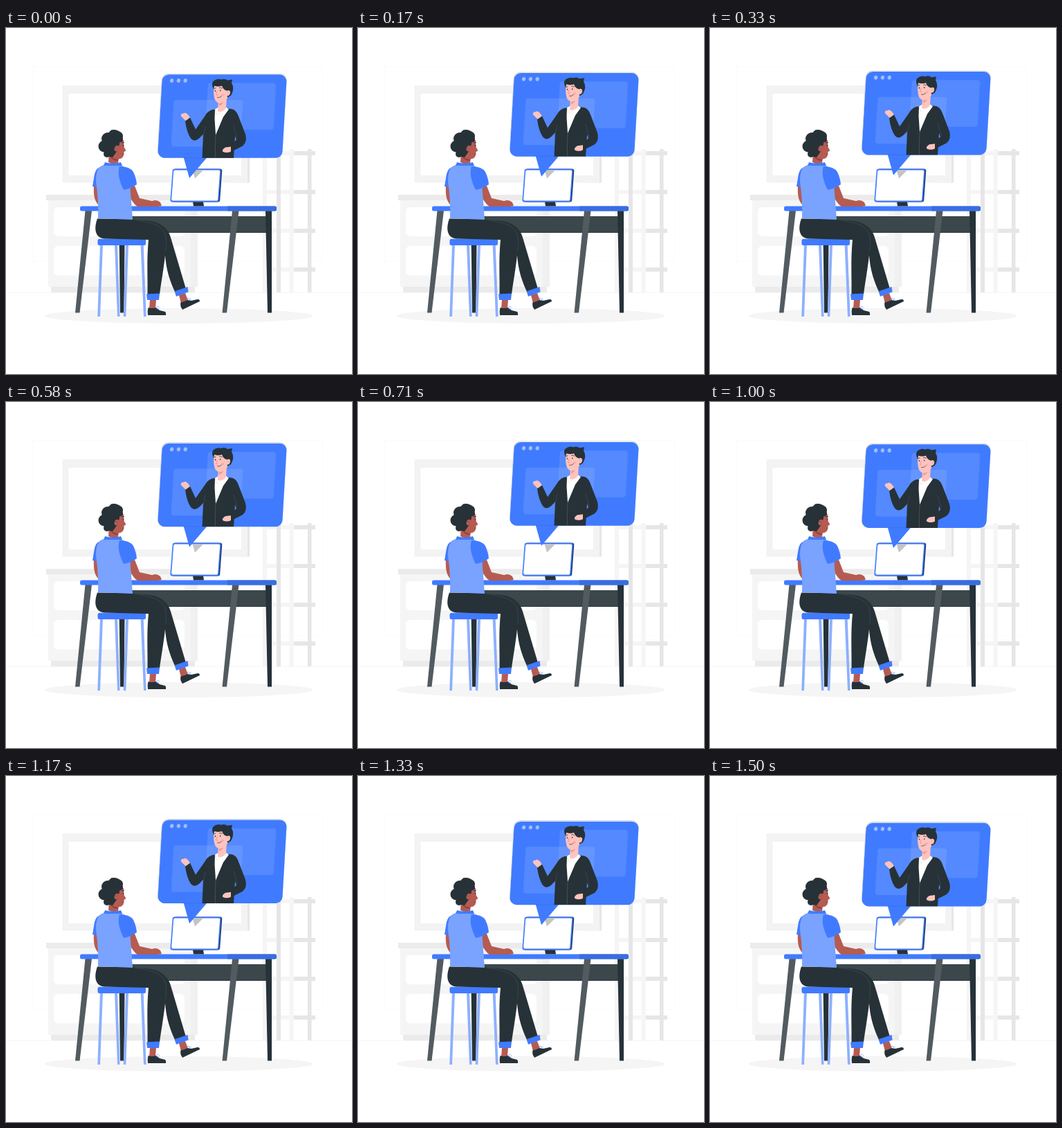
An HTML page with a canvas that plays this animation: 500x500 px, repeating every 1540 ms.

```html
<!DOCTYPE html>
<html lang="en">
<head>
<meta charset="utf-8">
<title>Video call</title>
<style>
html, body { margin: 0; width: 100%; height: 100%; overflow: hidden; background: #fff; }
canvas { display: block; width: 500px; height: 500px; }
</style>
</head>
<body>
<canvas id="stage"></canvas>
<script>
const canvas = document.getElementById('stage');
const ctx = canvas.getContext('2d');
const dpr = window.devicePixelRatio || 1;
canvas.width = canvas.height = 500 * dpr;

const LOOP = 1540, STEPS = 37, RISE = 10, PEAK_STEP = 17.5;
const BLUE = '#407bff', LIGHT_BLUE = '#79a3ff', LEG_BLUE = '#8cb0ff';
const DARK = '#263238', STEEL = '#525b60';
const BROWN = '#b55b52', PINK = '#ffc3bd';
const PALE = '#f5f5f5', GREY = '#e6e6e6';

function fill(color, d) {
  ctx.fillStyle = color;
  ctx.fill(new Path2D(d));
}

function line(color, width, d) {
  ctx.strokeStyle = color;
  ctx.lineWidth = width;
  ctx.lineCap = ctx.lineJoin = 'round';
  ctx.stroke(new Path2D(d));
}

function box(color, x1, y1, x2, y2, r = 0) {
  ctx.fillStyle = color;
  ctx.beginPath();
  ctx.roundRect(x1, y1, x2 - x1, y2 - y1, r);
  ctx.fill();
}

function oval(color, x, y, rx, ry, angle = 0) {
  ctx.fillStyle = color;
  ctx.beginPath();
  ctx.ellipse(x, y, rx, ry, angle, 0, Math.PI * 2);
  ctx.fill();
}

// Rounded parallelogram: top-left corner, width, height, leftward shift of the base.
function slanted(x, y, w, h, shift, r) {
  const corners = [[x, y], [x + w, y], [x + w - shift, y + h], [x - shift, y + h]];
  const path = new Path2D();
  path.moveTo(x + w / 2, y);
  for (let i = 1; i <= 4; i++) {
    path.arcTo(...corners[i % 4], ...corners[(i + 1) % 4], r);
  }
  path.closePath();
  return path;
}

function drawRoom() {
  ctx.strokeStyle = '#fafafa';
  ctx.lineWidth = 1;
  ctx.strokeRect(39.5, 55.5, 204, 282);
  ctx.strokeRect(255.5, 55.5, 202, 282);
  box('#ebebeb', 0, 382, 500, 382.6);

  box(GREY, 330, 83, 352, 223.5);
  box('#f3f3f3', 81.5, 83, 349, 223.5);
  box('#fff', 90.5, 95, 340, 213);

  box('#f0f0f0', 250, 249, 277, 374);
  box(PALE, 61, 249, 267, 374);
  box('#ebebeb', 58, 241, 277, 249);
  box('#ebebeb', 65, 374, 273, 382);
  box('#fff', 69, 259, 258, 301, 6);
  box('#fff', 69, 315, 258, 357.5, 6);

  box(PALE, 371, 175, 377, 382);
  box(GREY, 391, 175, 397, 382);
  for (let y = 178; y < 350; y += 56) {
    box(PALE, 377, y, 416, y + 6);
    box(GREY, 391, y, 397, y + 6);
    box(GREY, 416, y, 447, y + 6);
  }
  box(PALE, 409.5, 175, 415.5, 382);
  box(GREY, 436, 175, 441.5, 382);
  oval(PALE, 249.5, 416, 194, 11);
}

function drawDesk() {
  box('#3c474c', 166, 272, 378, 296);
  box('#313d43', 183, 294.8, 378, 296);
  fill(DARK, 'M163 264H172L170.5 411.5H165Z');
  fill(DARK, 'M375 264H384L384 411.5H378Z');
  fill(STEEL, 'M114.5 264H124L106.5 411.5H100Z');
  fill(STEEL, 'M327 264H336.5L319 411.5H312.5Z');
  box(BLUE, 107, 257.5, 391, 264.5, 2.5);
  box('#396ddf', 320, 257.5, 391, 264.5, [0, 2.5, 2.5, 0]);
}

function drawMonitor() {
  fill(DARK, 'M270 251H285L286 257.5H271Z');
  ctx.fillStyle = '#233f80';
  ctx.fill(slanted(242.5, 203.5, 70, 48, 3.5, 3));
  ctx.fillStyle = BLUE;
  ctx.fill(slanted(240.8, 203.5, 70, 48, 3.6, 3));
  ctx.fillStyle = '#fff';
  ctx.fill(slanted(242.3, 205.5, 67, 44, 3.3, 2));
  fill('#c4c4c4', 'M269.5 205.5H285L273 217.5Z');
}

function drawStool() {
  fill(LEG_BLUE, 'M136 313H140L136 417H132.3Z');
  fill(LEG_BLUE, 'M194.6 313H198.7L202.6 417H199Z');
  fill(LEG_BLUE, 'M157 313H161L164.5 417H161Z');
  fill(LEG_BLUE, 'M173 313H177L173.3 417H169.7Z');
  box(BLUE, 132.5, 304.8, 202, 314, 2.5);
}

function drawSitter() {
  // Feet
  fill(BROWN, 'M208 392H217L216 406H207Z');
  fill(BROWN, 'M250 386L259 383L263 394L253 398Z');
  fill(DARK, 'M205.5 404Q211 406 217 404L222 408L230 410Q232 412 231 415H205Q204 409 205.5 404Z');
  fill(DARK, 'M252.5 396.5Q258 396 262 393L268 394L277 392Q280 392 280 395L255 407Q251 402 252.5 396.5Z');
  line(LIGHT_BLUE, 0.7, 'M217 405L219 402L222 404M218 406L221 406M262 393L263 390L266 392M264 394L267 391');

  // Trousers
  fill(DARK, 'M174 279C220 274 234 286 239 306L260 377L245 383C235 362 228 339 230 307L190 304Z');
  fill(DARK, 'M132 275.5L183 276C202 279 226 283 230 297C234 314 227 350 222 385H204.5C205 360 203 335 206 306L143 304.5C130 304 126 292 132 275.5Z');
  line('#465157', 0.6, 'M184 277Q224 281 229.7 297Q233 308 230.5 322');
  fill(BLUE, 'M203 384.5L222 383.5L221 393H204Z');
  fill(BLUE, 'M243.5 380.5L262.5 374L263.5 381.5L246 388Z');

  // Arms, shirt and collar
  fill(BROWN, 'M127 228L135 229L135 257C129 252 126 244 127 228Z');
  fill(BLUE, 'M140 199Q130 202 128 211L125 229L134 231Z');
  fill(BROWN, 'M173 232L186 228L193 246L211 250Q218 247 223 252L225 257Q217 259 210 258L190 258Q182 253 173 232Z');
  fill(LIGHT_BLUE, 'M141 198H166Q175 202 178 212L183 277L133 275Q134 250 130 222C130 209 132 201 141 198Z');
  fill(BLUE, 'M164 200Q179 200 184 208Q188 216 189 226Q181 232 170 234C163 220 161 209 164 200Z');
  fill(BROWN, 'M149 177L164 181L162 195Q155 198 148 194Z');
  fill(BLUE, 'M143 194Q155 197 166 194L168 199H141Z');

  // Head
  fill(BROWN, 'M157 163L170 162L170.5 172L173.5 177L170.5 179Q171 187 165 189Q158 191 151 184Z');
  fill('#8f4640', 'M150 185Q155 189 162 190L161 192Q154 192 150 185Z');
  for (const [x, y, r] of [[147, 160, 9], [156, 155, 8], [163, 156, 6],
      [142, 171, 8.5], [150, 176, 8], [146, 182, 5], [155, 167, 9], [165, 161, 4]]) {
    oval(DARK, x, y, r, r);
  }
  fill(DARK, 'M152 147.5Q162 146 167 152Q170 158 167 164L162 167L161 177L154 187L145 185L143 157Z');
  oval(BROWN, 160, 174, 3.2, 4.4, 0.35);
  line('#8f4640', 0.6, 'M158.5 173Q160 171 161 174');
  oval(DARK, 169.5, 170, 0.7, 1.2);
  line(DARK, 0.9, 'M167.5 166L170.5 165.5');
  line('#8f4640', 0.7, 'M167 183L170 182');
}

function drawCaller() {
  // Raised hand, lower arms and jacket
  fill(PINK, 'M259 134L253 128Q252 124 256 124L259 123Q264 125 266 131L263 136Z');
  fill(DARK, 'M303 118Q293 118 288 127L274 147L266 130L259 135Q261 151 267 160Q272 166 279 160L288 151Z');
  fill(DARK, 'M301 118.5L322 117Q332 117 335 128L331 157L329 188.5H283.5L285 154L288 127Q293 119 301 118.5Z');
  fill(DARK, 'M326 117.5Q333 119 336 128L346 154Q349 165 342 171L324 180L321 173L333 162L327 146Z');
  fill(PINK, 'M325 172L317 173Q312 176 313 179Q319 182 325 179Z');
  line('#59646a', 0.6, 'M303 155Q302 171 302.5 188');
  line('#465157', 0.6, 'M329 142L334 160M288 143L285 157');

  // Shirt, neck and face
  fill('#fff', 'M302 118L307 115L318 115L322 118L314 129L303 155L301.5 132Z');
  line('#d9d9d9', 0.5, 'M302 118L305 126L311 121L320 118');
  fill(PINK, 'M307 105L319 99L318 116Q313 123 306 121Z');
  fill('#ed9c94', 'M308 109L315 105Q314 111 308 113Z');
  fill(PINK, 'M301 84Q312 80 321 87L322 98Q318 107 311 109Q304 110 301.5 103Q299 94 301 84Z');
  fill(DARK, 'M300 89Q296 81 300 77Q305 73 311 75Q316 73 320 76L327 75L326 80Q331 88 325 98L320 101L319 91Q314 90 312 84Q307 86 301 84Z');
  oval(PINK, 321, 94.5, 3, 4, 0.3);
  line('#ed9c94', 0.6, 'M320 95Q321 92 323 93');
  oval(DARK, 302.5, 91.5, 0.7, 1.1);
  oval(DARK, 309.7, 91, 0.7, 1.1);
  line(DARK, 0.8, 'M300.7 88.3L303 87.2M308.5 87Q310.5 86 312.5 87.7');
  line('#ed847e', 0.7, 'M305 92L303.6 97L305.7 97.4');
  line(DARK, 0.7, 'M305.5 101Q309 102 311.5 99');
  oval('rgba(237,132,126,.35)', 313, 97.5, 2.3, 1.6);
}

function drawBubble() {
  const panel = slanted(226, 67.8, 180, 120.6, 7, 10);
  ctx.fillStyle = '#a8b0bb';
  ctx.fill(slanted(225.5, 66.5, 180.5, 121.5, 7, 10));
  ctx.fillStyle = '#fff';
  ctx.fill(slanted(225.9, 67, 180, 121, 7, 10));
  ctx.fillStyle = BLUE;
  ctx.fill(panel);
  fill(BLUE, 'M256.5 187H291L265 217.5Z');
  line('#396ddf', 0.7, 'M257 188.1H290');

  ctx.save();
  ctx.clip(panel);
  ctx.fillStyle = 'rgba(255,255,255,.1)';
  ctx.fill(slanted(292, 80, 98.5, 67.5, 4, 4));
  ctx.fill(slanted(242.5, 104.5, 100, 67.5, 4, 4));
  for (let i = 0; i < 3; i++) oval('rgba(255,255,255,.5)', 239.6 + i * 9.8, 76.5, 2.6, 2.9, 0.3);
  drawCaller();
  ctx.restore();
}

// The bubble drifts up and down at constant speed, advancing in discrete steps.
function lift(time) {
  const step = Math.floor((time % LOOP + 8) * STEPS / LOOP) % STEPS;
  return RISE * Math.max(0, 1 - Math.abs(step - PEAK_STEP) / (STEPS / 2));
}

let start;
function render(now) {
  start ??= now;
  ctx.setTransform(dpr, 0, 0, dpr, 0, 0);
  ctx.fillStyle = '#fff';
  ctx.fillRect(0, 0, 500, 500);
  drawRoom();
  drawDesk();
  drawMonitor();
  drawStool();
  drawSitter();
  ctx.translate(0, -lift(now - start));
  drawBubble();
  requestAnimationFrame(render);
}
requestAnimationFrame(render);
</script>
</body>
</html>
```
